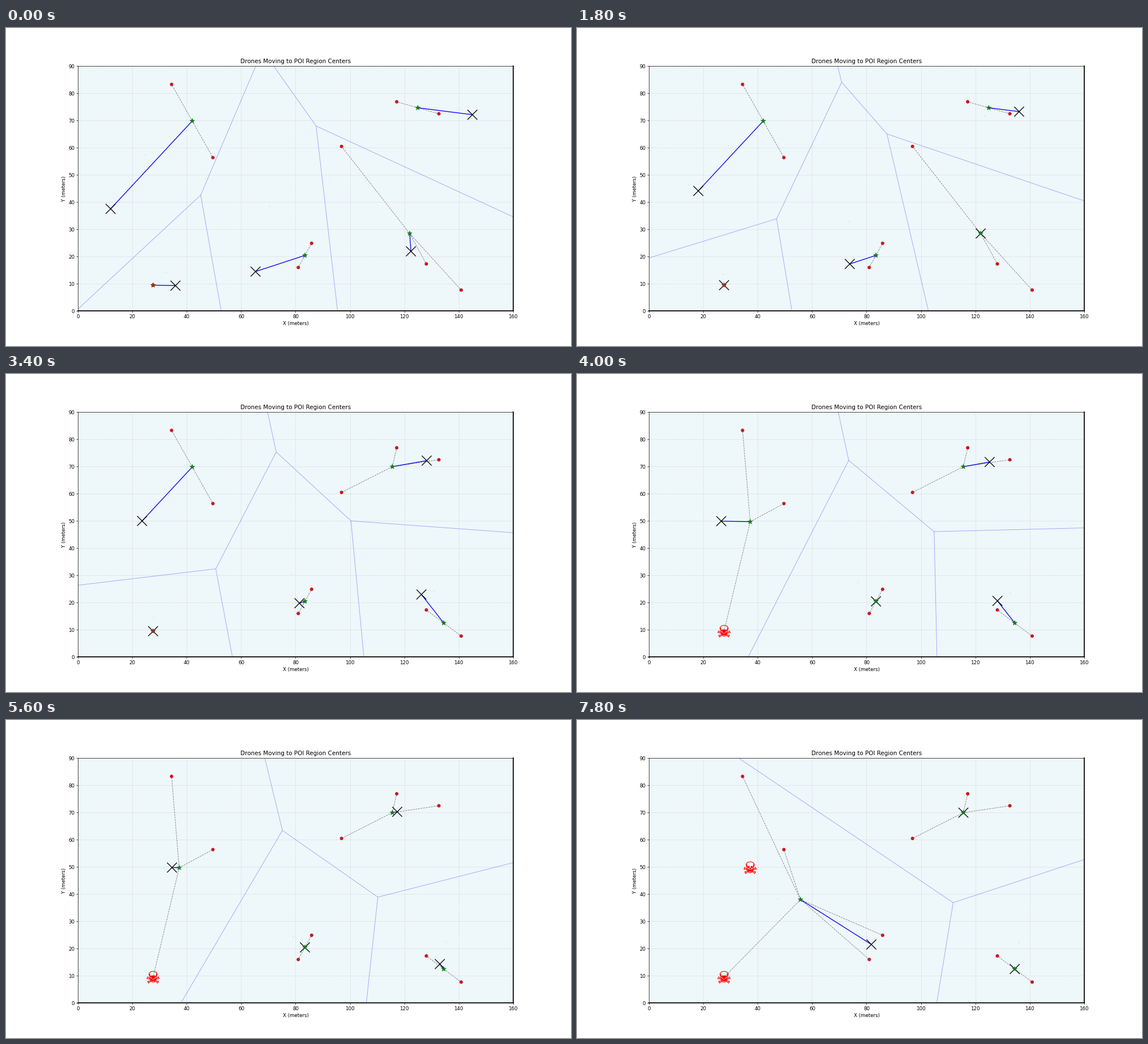
A matplotlib script for the animation above (8 s loop, 998 by 561 pixels).

```python
import matplotlib.pyplot as plt
import numpy as np
from matplotlib.animation import FuncAnimation
from matplotlib.collections import LineCollection

WIDTH, HEIGHT, DPI = 998, 561, 62.375
AREA_W, AREA_H = 160, 90
FRAMES, INTERVAL = 40, 200
SPEED = 1.0

POIS = np.array([
    (34.4, 83.3), (49.6, 56.4), (117.2, 76.9), (132.7, 72.5), (96.9, 60.5),
    (128.1, 17.3), (140.9, 7.7), (85.9, 24.9), (81.0, 16.0), (27.6, 9.5),
])
STARTS = np.array([
    (11.3, 36.83), (36.83, 9.32), (64.32, 14.19), (122.5, 20.95), (146.03, 72.03),
])
FAILURES = {18: 1, 38: 0}  # step -> drone that is lost


def clip_nearer(poly, site, other):
    """Keep the part of a polygon that is nearer to site than to other."""
    normal = other - site
    side = (poly - (site + other) / 2) @ normal
    kept = []
    for i in range(len(poly)):
        j = (i + 1) % len(poly)
        if side[i] <= 0:
            kept.append(poly[i])
        if side[i] * side[j] < 0:
            kept.append(poly[i] + (poly[j] - poly[i]) * side[i] / (side[i] - side[j]))
    return np.array(kept)


def centroid(poly):
    nxt = np.roll(poly, -1, axis=0)
    cross = poly[:, 0] * nxt[:, 1] - nxt[:, 0] * poly[:, 1]
    return ((poly + nxt) * cross[:, None]).sum(axis=0) / (3 * cross.sum())


def voronoi(sites):
    """Inner borders and centroids of the regions within the area."""
    area = np.array([(0, 0), (AREA_W, 0), (AREA_W, AREA_H), (0, AREA_H)], float)
    borders, centers = [], []
    for i, site in enumerate(sites):
        poly = area
        for j, other in enumerate(sites):
            if j != i:
                poly = clip_nearer(poly, site, other)
        centers.append(centroid(poly))
        for a, b in zip(poly, np.roll(poly, -1, axis=0)):
            x, y = mid = (a + b) / 2
            inside = 1e-6 < x < AREA_W - 1e-6 and 1e-6 < y < AREA_H - 1e-6
            nearest = np.argsort(np.hypot(*(sites - mid).T))[:2]
            if inside and i == nearest.min():
                borders.append((a, b))
    return borders, np.array(centers)


def simulate():
    pos = STARTS.copy()
    alive = list(range(len(pos)))
    lost, states = [], []
    for step in range(FRAMES):
        if step in FAILURES:
            drone = FAILURES[step]
            alive.remove(drone)
            lost.append(pos[drone].copy())
        sites = pos[alive]
        borders, centers = voronoi(sites)
        gaps = np.linalg.norm(POIS[:, None] - sites[None], axis=2)
        owner = gaps.argmin(axis=1)
        goals = np.array([POIS[owner == i].mean(axis=0) for i in range(len(sites))])
        delta = goals - sites
        dist = np.linalg.norm(delta, axis=1, keepdims=True)
        moved = np.where(dist <= SPEED, goals,
                         sites + SPEED * delta / np.maximum(dist, 1e-9))
        pos[alive] = moved
        states.append(dict(
            borders=borders, centers=centers, goals=goals, drones=moved,
            links=list(zip(goals[owner], POIS)),
            routes=list(zip(moved, goals)),
            lost=np.array(lost).reshape(-1, 2),
        ))
    return states


STATES = simulate()

# the small margin guards against losing a pixel to rounding
fig = plt.figure(figsize=((WIDTH + 1e-3) / DPI, (HEIGHT + 1e-3) / DPI), dpi=DPI)
ax = fig.add_axes([0.1275, 0.11, 0.77, 0.77])
ax.set_xlim(0, AREA_W)
ax.set_ylim(0, AREA_H)
ax.set_facecolor("#eef7fa")
ax.grid(True, linestyle=":", color="#b0b0b0", alpha=0.8)
ax.set_axisbelow(True)
ax.set_title("Drones Moving to POI Region Centers")
ax.set_xlabel("X (meters)", labelpad=3)
ax.set_ylabel("Y (meters)")
for name in ("right", "bottom"):
    ax.spines[name].set_linewidth(2)


def add_lines(**style):
    lines = LineCollection([], **style)
    ax.add_collection(lines, autolim=False)
    return lines


def add_marks(marker, size, color, zorder, edge=1.0):
    marks = ax.scatter([], [], marker=marker, color=color, linewidths=edge, zorder=zorder)
    # more than one size keeps the marks from snapping to whole pixels
    marks.set_sizes([size**2] * 2)
    return marks


lines = {
    "borders": add_lines(colors="blue", alpha=0.35, linewidths=1, zorder=2),
    "links": add_lines(colors="gray", linestyles="--", linewidths=1, zorder=3),
    "routes": add_lines(colors="#0000e6", linewidths=1.5, zorder=4),
}
marks = {
    "centers": add_marks("o", 1.2, "#d09a9a", 2.5, edge=0),
    "drones": add_marks("x", 20, "black", 5, edge=1.5),
    "goals": add_marks("*", 10, "#147a1e", 6),
    "lost": add_marks("$\u2620$", 26, "red", 8, edge=0.5),
}
add_marks("o", 6, "#c8191e", 7).set_offsets(POIS)


def update(frame):
    state = STATES[frame]
    for key, artist in lines.items():
        artist.set_segments(state[key])
    for key, artist in marks.items():
        artist.set_offsets(state[key])
    return [*lines.values(), *marks.values()]


anim = FuncAnimation(fig, update, frames=FRAMES, interval=INTERVAL,
                     repeat=True, repeat_delay=0, blit=False)
plt.show()
```
